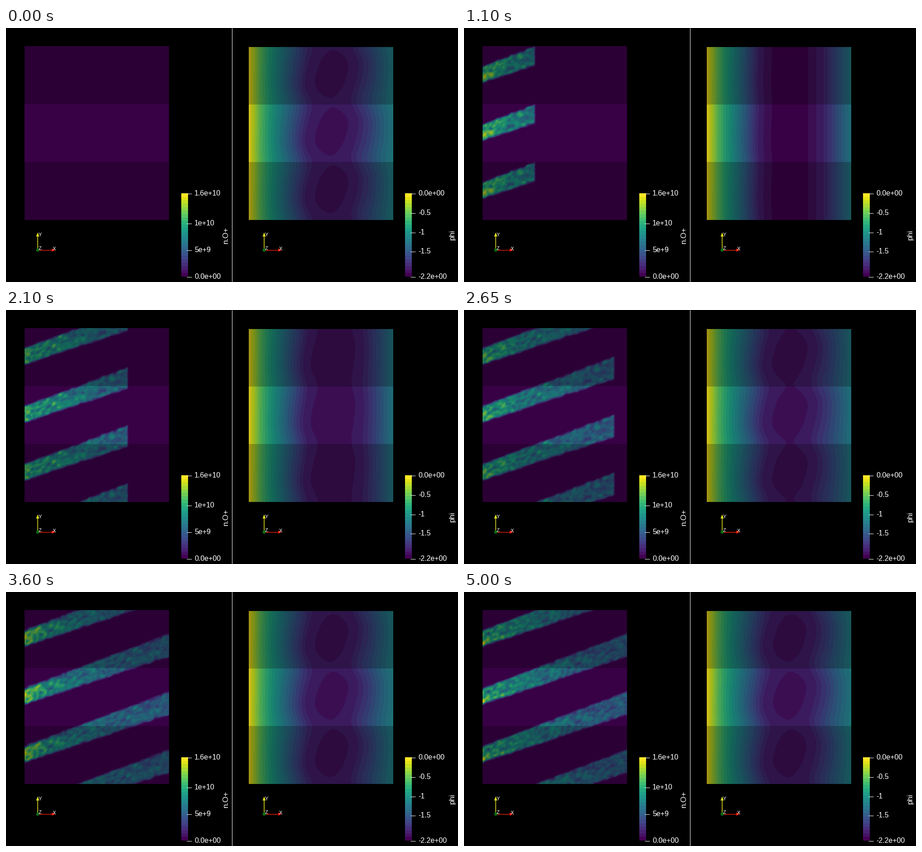
Recreate the animation shown at these times as a matplotlib script. Size 998 by 561 pixels, loop 5.05 s.

```python
import numpy as np
import matplotlib.pyplot as plt
from matplotlib.animation import FuncAnimation
from matplotlib.patches import Circle, Polygon, Rectangle

W, H, DPI = 998, 561, 100
FRAMES, STEP = 101, 50
BANDS = 24
LUT = plt.get_cmap("viridis")(np.linspace(0, 1, BANDS))[:, :3] * 255
MID_LIGHT, OUTER_LIGHT = 0.83, 0.64

plt.rcParams["font.family"] = "Liberation Sans"
fig = plt.figure(figsize=(W / DPI, H / DPI), dpi=DPI, facecolor="black")
ax = fig.add_axes([0, 0, 1, 1])
ax.axis("off")


class Panel:
    """A field shown three times, with the outer copies dimmer."""

    def __init__(self, x0, x1, y0, y1, cut1, cut2):
        self.x, self.y = np.meshgrid(np.arange(x0, x1) + 0.5,
                                     np.arange(y0, y1) + 0.5)
        mid = (self.y > cut1) & (self.y < cut2)
        self.light = np.where(mid, MID_LIGHT, OUTER_LIGHT)[..., None]
        self.image = ax.imshow(np.zeros(self.x.shape + (3,), np.uint8),
                               extent=(x0, x1, y1, y0),
                               interpolation="nearest", zorder=2)

    def show(self, v):
        band = np.clip((v * BANDS).astype(int), 0, BANDS - 1)
        self.image.set_data((LUT[band] * self.light).astype(np.uint8))


def make_noise(rows, cols, sy, sx):
    raw = np.random.default_rng(8).standard_normal((rows, cols))
    fy = np.fft.fftfreq(rows)[:, None]
    fx = np.fft.fftfreq(cols)[None, :]
    soft = np.exp(-2 * np.pi ** 2 * ((fy * sy) ** 2 + (fx * sx) ** 2))
    out = np.fft.ifft2(np.fft.fft2(raw) * soft).real
    return out / out.std()


density = Panel(41, 360, 40, 424, 168, 296)
potential = Panel(536, 855, 42, 424, 169, 296)
noise = make_noise(128, 1000, 2.3, 3.0)

# beam geometry, repeating every 128 px down the panel
run = density.x - 41
drop = density.y - 230.5 + 0.354 * run
offset = (drop + 64) % 128 - 64
half = 17.5 + 0.024 * run
level = 0.29 + 0.4 * np.exp(-run / 130)
row = np.floor(drop).astype(int) % 128

# potential before the beam arrives and once it has settled
px = potential.x
turn = 2 * np.pi * (potential.y - 101.5) / 127.33
START = np.interp(
    px,
    [536, 546, 560, 575, 600, 625, 645, 658, 672, 690, 720, 745, 760, 778, 800, 825, 855],
    [1, .9, .76, .64, .47, .31, .1875, .125, .0625, .03, .01, .03, .0625, .125, .21, .32, .46])
lean = px + 6 * np.sin(turn) * np.exp(-((px - 719) / 90) ** 2)
sides = np.interp(lean, [536, 546, 560, 575, 600, 625, 650, 662, 776, 800, 825, 855],
                  [1, .9, .76, .65, .49, .36, .24, .1875, .1875, .26, .36, .47])
bowl = 0.0905 + 2.99e-5 * (lean - 719) ** 2
fade = np.clip((px - 556) / 80, 0, 1) * np.clip((880 - px) / 80, 0, 1)
wave = 1 - np.cos(turn) - 0.2 * (1 - np.cos(2 * turn))
END = np.where(np.abs(lean - 719) < 57, bowl, sides) + 0.0196 * wave * fade


def front(k):
    return 5.4 * (k - 1) + 0.0035 * (k - 1) ** 2


def smooth(t):
    t = np.clip(t, 0, 1)
    return t * t * (3 - 2 * t)


def beam(k):
    if k == 0:
        return np.zeros_like(run)
    col = np.floor(run - 5.5 * k).astype(int) % 1000
    grain = noise[row, col]
    side = smooth((half + 0.4 * grain - np.abs(offset)) / 9 + 0.45)
    head = smooth((front(k) - run) / 7 + 0.5)
    return np.clip(level * (1 + 0.15 * grain), 0, 1) * side * head


def phi(k):
    s = 1.0
    if k > 0:
        z = np.clip((536 + front(k) - px) / 24 + 0.4, -30, 30)
        s = min(1, k / 56) / (1 + np.exp(-z))
    v = START + s * (END - START)
    # deepen the low end of the scale
    return np.interp(v, [0, 0.1875, 0.5, 1], [0, 0.125, 0.5, 1])


def text(x, y, s, px_size=16, **kw):
    ax.text(x, y, s, color="white", fontsize=px_size * 72 / DPI, zorder=5, **kw)


def line(xs, ys, color, width=1.0):
    ax.plot(xs, ys, color=color, lw=width * 72 / DPI, zorder=4,
            solid_capstyle="butt")


def colorbar(x, ticks, title, title_x):
    top, bottom = 365, 549
    h = (bottom - top) / BANDS
    for i, c in enumerate(LUT):
        ax.add_patch(Rectangle((x, bottom - (i + 1) * h), 15, h, fc=c / 255,
                               lw=0, antialiased=False, zorder=3))
    for y, label in ticks:
        line([x + 12, x + 23], [y + 0.5] * 2, "white")
        text(x + 29, y, label, va="center")
    text(title_x, 457, title, 17, rotation=90, ha="center", va="center")


def triad(x):
    y = 490.5
    line([x, x + 32], [y, y], "#d01808", 1.6)
    line([x, x], [y, y - 31], "#d8d820", 1.6)
    ax.add_patch(Polygon([(x + 31, y - 3.5), (x + 31, y + 3.5), (x + 39, y)],
                         fc="#f01c08", lw=0, zorder=4))
    ax.add_patch(Polygon([(x - 3.5, y - 30), (x + 3.5, y - 30), (x, y - 39)],
                         fc="#e0e020", lw=0, zorder=4))
    ax.add_patch(Circle((x, y), 3.6, fc="#0a6a14", lw=0, zorder=5))
    text(x + 1.5, 460, "Y", 11)
    text(x + 2, 490, "Z", 11)
    text(x + 32.5, 491, "X", 11)


line([499.5, 499.5], [0, H], "white")
colorbar(387, [(365, "1.6e+10"), (431, "1e+10"), (490, "5e+9"),
               (549, "0.0e+00")], "n.O+", 485)
colorbar(881, [(365, "0.0e+00"), (408, "-0.5"), (451, "-1"), (493, "-1.5"),
               (549, "-2.2e+00")], "phi", 985)
triad(70)
triad(570)
ax.set_xlim(0, W)
ax.set_ylim(H, 0)
ax.set_aspect("auto")


def update(k):
    density.show(beam(k))
    potential.show(phi(k))
    return density.image, potential.image


anim = FuncAnimation(fig, update, frames=FRAMES, interval=STEP,
                     init_func=lambda: update(0), repeat=True, repeat_delay=0)
plt.show()
```
